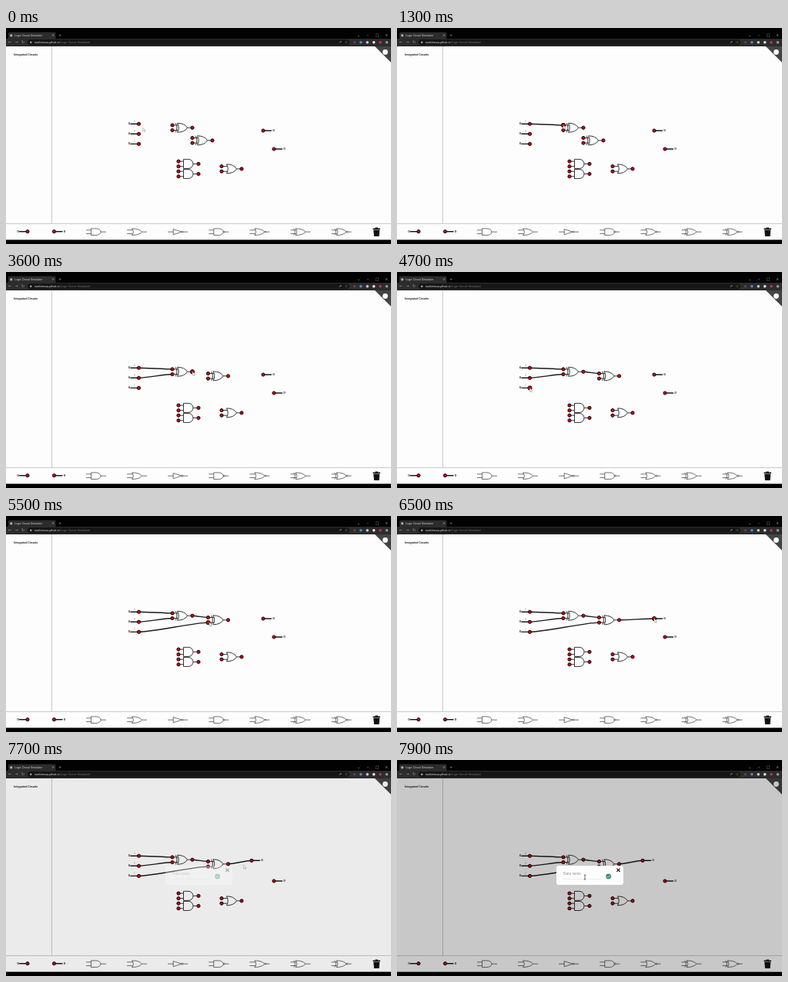
Animation, 500 px wide and 282 px high, one loop 8 s. Source, as an HTML page:

```html
<!DOCTYPE html>
<html lang="en">
<head>
<meta charset="utf-8">
<title>Logic Circuit Simulator</title>
<style>
  html, body { margin: 0; width: 100%; height: 100%; overflow: hidden; background: #fdfdfd; }
  svg { display: block; width: 100vw; height: 100vh; font-family: Inter, "Open Sans", sans-serif; }
  .ink { fill: none; stroke: #222; stroke-width: .9; }
  .ink * { vector-effect: non-scaling-stroke; }
  #tools .ink { stroke: #444; stroke-width: .75; }
  .wire { fill: none; stroke: #1a1a1a; stroke-width: 1.4; stroke-linecap: round; }
  .pin { fill: #ba0f1a; stroke: #1e0406; }
  .bit { font-size: 4px; font-weight: 700; fill: #222; text-anchor: middle; }
  .tag { font-size: 3px; fill: #999; text-anchor: middle; }
  .icon { font: 5px "DejaVu Sans", sans-serif; fill: #aaa; text-anchor: middle; }
  .rule { stroke: #c9c9c9; }
</style>
</head>
<body>
<svg viewBox="0 0 500 282" preserveAspectRatio="none">
  <rect width="500" height="282" fill="#fdfdfd"/>
  <path class="rule" d="M59.5 24V255.5M0 255.5H500"/>
  <text x="10.3" y="35.8" font-size="3.4" font-weight="700" fill="#222">Integrated Circuits</text>
  <path d="M479 24H500V45Z" fill="#444"/>
  <circle cx="492.5" cy="31.5" r="3.4" fill="#fdfdfd"/>

  <g id="board"></g>
  <g id="wires"></g>
  <g id="pins"></g>
  <g id="tools"></g>
  <path d="M476.5 261.5H486V263H476.5ZM479.5 260.5H483V262H479.5ZM477.2 263.5H485.3L484.6 272H478Z" fill="#111"/>

  <rect id="shade" y="24" width="500" height="252" opacity="0"/>
  <g id="dialog" opacity="0">
    <rect x="207" y="138" width="87" height="25" rx="3" fill="#fdfdfd"/>
    <text x="215.5" y="150.4" font-size="4.4" fill="#8c8c8c">State name</text>
    <path d="M215.5 155.5H266" stroke="#e4e4e4" stroke-width=".6"/>
    <circle cx="274.7" cy="152" r="3.4" fill="#3f8f7c"/>
    <path d="M273 152l1.3 1.3l2.3-2.6" fill="none" stroke="#e8f4f0" stroke-width=".8"/>
    <path d="M285.4 141.6l4.2 4.2m0-4.2l-4.2 4.2" stroke="#111" stroke-width="1.2"/>
  </g>

  <rect width="500" height="14" fill="#020202"/>
  <rect x="3" y="5.5" width="61.5" height="10" rx="1.5" fill="#2c2c2d"/>
  <rect y="14" width="500" height="10" fill="#2c2c2d"/>
  <rect x="28" y="15" width="418" height="7.4" rx="3.7" fill="#161617"/>
  <rect y="276.5" width="500" height="6"/>
  <circle cx="6.8" cy="9.8" r="1.7" fill="#aaa"/>
  <text x="11" y="11.2" font-size="3.4" fill="#ddd">Logic Circuit Simulator</text>
  <text x="37" y="19.9" font-size="3.4" fill="#e4e4e4">marlotessa.github.io<tspan fill="#777">/Logic-Circuit-Simulator/</tspan></text>
  <g id="chrome"></g>

  <path id="arrow" d="M0 0V5L1.3 3.9L2.3 5.8L2.9 5.4L2.1 3.6H3.6Z" fill="#fff" stroke="#777" stroke-width=".4"/>
  <path id="beam" d="M-1.2-3H1.2M0-3V3M-1.2 3H1.2" fill="none" stroke="#333" stroke-width=".7"/>
</svg>
<script>
const LOOP = 8000, STEP = 100, TRAVEL = 700;
const $ = id => document.getElementById(id);

function add(parent, tag, attrs, text) {
  const el = document.createElementNS("http://www.w3.org/2000/svg", tag);
  for (const k in attrs) el.setAttribute(k, attrs[k]);
  if (text) el.textContent = text;
  return parent.appendChild(el);
}
const move = (el, [x, y]) => el.setAttribute("transform", `translate(${x} ${y})`);

function ease(t, start, end) {
  const u = Math.max(0, Math.min(1, (t - start) / (end - start)));
  return u * u * (3 - 2 * u);
}

// Browser buttons: evenly spaced rows of glyphs and extension dots
function row(glyphs, x, y, gap) {
  [...glyphs].forEach((ch, i) => add($("chrome"), "text", { class: "icon", x: x + i * gap, y }, ch));
}
row("←→↻", 5, 20.4, 8.6);
row("×+", 61, 11.4, 9);
row("⇗☆", 434, 20.4, 8);
row("⌄–□×", 458, 11.4, 12);
["#5a4444", "#4f86d8", "#ccc", "#eee", "#c8324f", "#999"].forEach((fill, i) =>
  add($("chrome"), "circle", { cx: 452.5 + i * 8.4, cy: 18.7, r: 1.8, fill }));
add($("chrome"), "circle", { cx: 32.3, cy: 18.7, r: 1.2, fill: "#aaa" });

// Gate symbols, centred on 0,0
const AND = { d: "M-6.5-6H0A6 6 0 0 1 0 6H-6.5Z", back: -6.5, tip: 6 };
const OR = { d: "M-6.5-6Q3-6 6.5 0Q3 6-6.5 6Q-3 0-6.5-6Z", back: -5.5, tip: 6.5 };
const XOR = { ...OR, d: OR.d + "M-8.8-6Q-5.3 0-8.8 6" };
const NOT = { d: "M-6-5L5 0L-6 5Z", back: -6, tip: 5 };

function symbol(parent, kind, ys = 1, bubble = 0) {
  const g = add(parent, "g", { class: "ink" });
  const leads = kind === NOT ? [0] : [-3.3 * ys, 3.3 * ys];
  leads.forEach(y => add(g, "path", { d: `M-13 ${y}H${kind.back}` }));
  add(g, "path", { d: `M${kind.tip + 2 * bubble} 0H13` });
  add(g, "path", { d: kind.d, transform: `scale(1 ${ys})` });
  if (bubble) add(g, "circle", { cx: kind.tip + bubble, r: bubble });
  return g;
}

// Digit and lead: side -1 for inputs, 1 for outputs
function terminal(parent, side, tag) {
  const g = add(parent, "g", {});
  add(g, "path", { class: "wire", d: `M0 0H${side * 10.5}` });
  add(g, "text", { class: "bit", x: side * 13 + .5, y: .8 }, "0");
  if (tag) add(g, "text", { class: "tag", x: -5.5, y: -2.6 }, tag);
  return g;
}

const parts = [];
function part(el, x, y, pinSpots) {
  const p = { el, x, y };
  p.at = t => {
    const k = p.drag ? ease(t, p.drag.start, p.drag.end) : 0;
    return k ? [x + p.drag.dx * k, y + p.drag.dy * k] : [x, y];
  };
  p.pins = pinSpots.map(([px, py]) => ({
    el: add($("pins"), "circle", { class: "pin" }),
    at: t => { const [cx, cy] = p.at(t); return [cx + px, cy + py]; }
  }));
  parts.push(p);
  return p;
}
const board = $("board");
const gate = (kind, x, y) => part(symbol(board, kind), x, y, [[-13, -3.3], [-13, 3.3], [13, 0]]);
const port = (side, x, y, tag) => part(terminal(board, side, tag), x, y, [[0, 0]]);

const [a, b, c] = ["A", "B", "C"].map((tag, i) => port(-1, 172.5, 125.2 + i * 13.1, tag).pins[0]);
const xor1 = gate(XOR, 229, 130.2);
const xor2 = gate(XOR, 255, 146.8);
gate(AND, 237, 177.4);
gate(AND, 237, 190.5);
gate(OR, 293, 183.9);
const sum = port(1, 334, 134);
port(1, 348, 158);

const tools = $("tools");
[[28, -1], [62.5, 1]].forEach(([x, side]) => {
  const g = terminal(tools, side);
  add(g, "circle", { class: "pin", r: 2.1 });
  move(g, [x, 265.7]);
});
[[AND], [OR], [NOT, 1], [AND, 1], [OR, 1], [XOR], [XOR, 1]].forEach(([kind, bubble], i) =>
  move(symbol(tools, kind, .72, bubble), [117 + i * 53.1, 266.2]));

// The pointer's errands; each leaves stops for it to visit
const stops = [], wires = [];
const stop = (t, x, y) => stops.push({ t, x, y });

function connect(from, to, start, end) {
  wires.push({ from, to, start, end, el: add($("wires"), "path", { class: "wire" }) });
  stop(start, ...from.at(start));
  stop(end, ...to.at(end));
}
function drag(p, start, end, dx, dy, grip = 0) {
  p.drag = { start, end, dx, dy };
  [start, end].forEach(t => {
    const [x, y] = p.at(t);
    stop(t, x + grip, y);
  });
}

stop(0, 177.5, 130);
connect(a, xor1.pins[0], 500, 900);
connect(b, xor1.pins[1], 2000, 2500);
drag(xor2, 2800, 3300, 20.5, -11);
connect(xor1.pins[2], xor2.pins[0], 3600, 4000);
connect(c, xor2.pins[1], 4700, 5400);
connect(xor2.pins[2], sum.pins[0], 6100, 6500);
drag(sum, 6700, 7400, -15, -2.7, 12);
stop(7600, 331, 131.3);
stop(7900, 244, 153);

function pointer(t) {
  const i = stops.findIndex(s => s.t > t);
  if (i < 0) return [244, 153];
  const p = stops[i - 1], q = stops[i];
  const k = ease(t, Math.max(p.t, q.t - TRAVEL), q.t);
  return [p.x + (q.x - p.x) * k, p.y + (q.y - p.y) * k];
}

function curve([x0, y0], [x1, y1]) {
  const d = (x1 - x0) * .2;
  return `M${x0} ${y0}C${x0 + d} ${y0} ${x1 - d} ${y1} ${x1} ${y1}`;
}

function draw(t) {
  const mouse = pointer(t);
  parts.forEach(p => {
    move(p.el, p.at(t));
    p.pins.forEach(({ el, at }) => {
      const [x, y] = at(t);
      move(el, [x, y]);
      el.setAttribute("r", Math.hypot(x - mouse[0], y - mouse[1]) < 3 ? 2.6 : 2.1);
    });
  });
  wires.forEach(w => w.el.setAttribute("d",
    t < w.start ? "" : curve(w.from.at(t), t < w.end ? mouse : w.to.at(t))));

  const fade = Math.max(0, (t - 7600) / 300);
  $("shade").setAttribute("opacity", fade * .21);
  $("dialog").setAttribute("opacity", fade);

  const typing = t >= 7800;
  $("arrow").style.display = typing ? "none" : "";
  $("beam").style.display = typing ? "" : "none";
  move($(typing ? "beam" : "arrow"), mouse);
}

const begin = performance.now();
function tick() {
  const t = (performance.now() - begin) % LOOP;
  draw(Math.floor(t / STEP) * STEP);
  requestAnimationFrame(tick);
}
tick();
</script>
</body>
</html>
```
